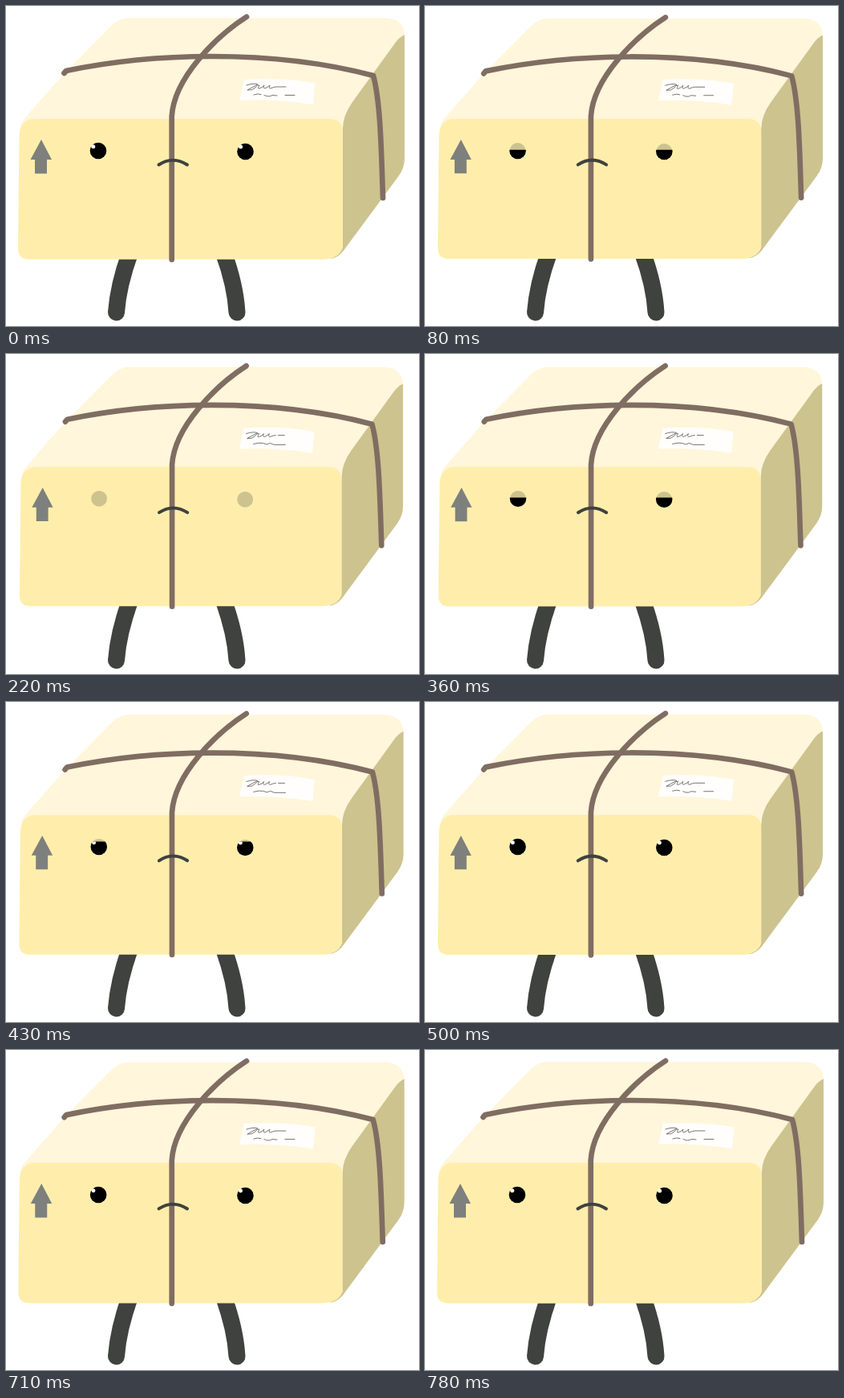
Write an HTML page that moves like this. It is 515 px wide and 400 px high and loops after 1620 ms.

```html
<!DOCTYPE html>
<html>
<head>
<meta charset="utf-8">
<style>
  html, body { margin: 0; width: 100%; height: 100%; overflow: hidden; background: #fff; }
  svg { display: block; width: 515px; height: 400px; }
  .line { fill: none; stroke-linecap: round; stroke-linejoin: round; }
</style>
</head>
<body>
<svg viewBox="0 0 515 400">
  <clipPath id="open"><rect id="slit" x="90" width="240" height="60"/></clipPath>
  <g class="line" stroke="#40423f" stroke-width="21">
    <path d="M154.500 309Q140 349 137.500 383"/>
    <path d="M271.500 309Q286 349 288 383"/>
  </g>
  <g id="box">
    <path fill="#fff6db" d="M150 15H473Q497 16 497 39L425 165H17Q16 150 22 142L70 87L128 28Q139 16 150 15Z"/>
    <path fill="#cdc38f" d="M497 36Q490 39 484 48L432 120Q420 137 420 153L405 316Q413 315 420 307L490 212Q497 202 497 190Z"/>
    <path fill="#ffeeab" d="M36 141H403Q420 141 420 158V302Q415 316.700 394 316.700H29Q15 316.700 15 303L16.500 162Q18 141 36 141Z"/>
    <path fill="#fffefc" d="M297 92Q345 89 385.500 96.500L383 123.500Q336 116 291 118Z"/>
    <path id="scrawl" class="line" stroke="#666" stroke-width=".9"/>
    <g class="line" stroke="#806d62" stroke-width="6.700">
      <path d="M300 13.500C262 38 209.500 90 206.700 138V317"/>
      <path d="M72.500 84L75 81C180 59 330 53 458 87C467 120 468 180 470 240"/>
    </g>
    <path fill="#7e807d" d="M44 167L57 192H51V209.500H36V192H30.500Z"/>
    <g fill="#cdc38f">
      <circle cx="115" cy="181" r="10"/>
      <circle cx="298.500" cy="182" r="10"/>
    </g>
    <g clip-path="url(#open)">
      <circle cx="115" cy="181" r="10.300"/>
      <circle cx="298.500" cy="182" r="10.300"/>
      <circle cx="108.800" cy="175.800" r="2.500" fill="#fff"/>
      <circle cx="292.600" cy="176" r="2.500" fill="#fff"/>
    </g>
    <path class="line" stroke="#40423f" stroke-width="4" d="M190.500 198.500Q208 187 226 198.500"/>
  </g>
</svg>
<script>
const LOOP = 1620;
// start time, squeeze of the box, how far the lids are down
const poses = [
  [0, 0, 0], [80, .5, .43], [150, .75, .8], [220, 1, 1], [290, 1, .8],
  [360, .9, .42], [430, .7, .2], [500, .5, 0], [640, .35, 0], [710, .15, 0], [780, 0, 0]
];
const word = 'M300 99q9-3 14-1L301 105q6 1 10-3q2-4 5-3q-3 5 0 4q4-1 6-4q-2 4 1 4q4-2 6-4q-2 4 1 4q4-2 7-2';
const wide = word + 'h12M309 111q5-2 9-.5m4 1q6 3 10 0l6 .5m10-.5h12';
const tight = word + 'm3 0h8M309 112q7-2 12-1q5 3 9 0l5 2h14';
const get = id => document.getElementById(id);
const box = get('box'), slit = get('slit'), scrawl = get('scrawl');

function draw(now) {
  const t = now % LOOP;
  const [, squeeze, lid] = poses.findLast(p => p[0] <= t);
  const sx = 1 - .008 * squeeze, sy = 1 - .009 * squeeze;
  box.setAttribute('transform', `translate(256 165) scale(${sx} ${sy}) translate(-256 -165)`);
  slit.setAttribute('y', 170 + 23 * lid);
  scrawl.setAttribute('d', squeeze > .6 ? tight : wide);
}

const start = performance.now();
function frame() {
  draw(performance.now() - start);
  requestAnimationFrame(frame);
}
frame();
</script>
</body>
</html>
```
